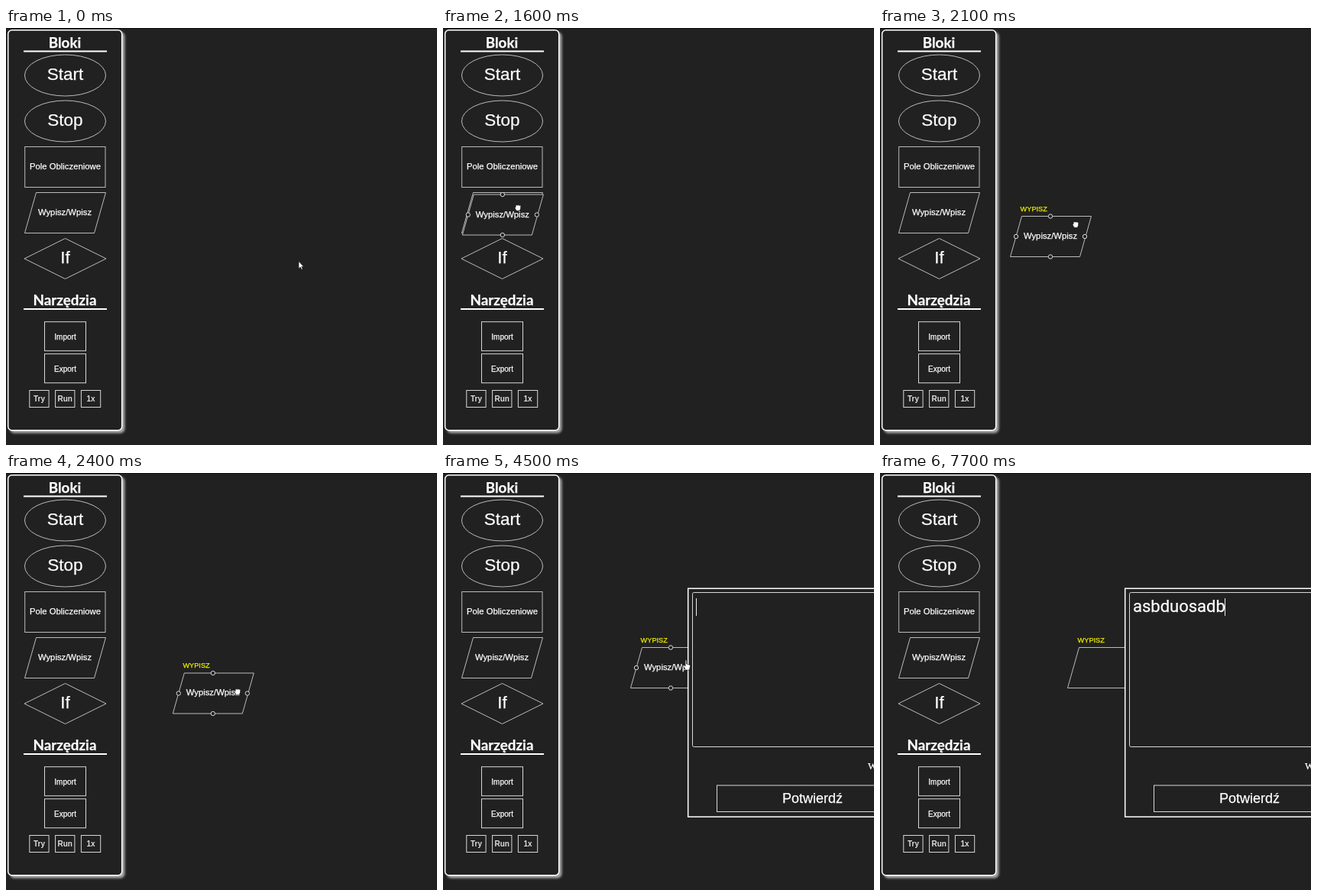
Write an HTML page that moves like this. It is 564 px wide and 546 px high and loops after 8 s.

```html
<!DOCTYPE html>
<html lang="pl">
<head>
<meta charset="utf-8">
<title>Bloki</title>
<style>
  html, body { margin: 0; width: 100%; height: 100%; overflow: hidden; background: #212121; }
  svg { display: block; width: 564px; height: 546px; }
  text { font-family: "Liberation Sans", Arial, sans-serif; fill: #fff; stroke: #fff; stroke-width: .25; text-anchor: middle; }
  .head { font: bold 18.8px Lato, sans-serif; }
  .big { font-size: 22.5px; }
  .mid { font-size: 11.3px; }
  .small { font-size: 10px; }
  .tool { font-size: 10px; font-weight: bold; fill: #ddd; stroke: none; }
  .label { font-size: 9.2px; fill: #f0f000; stroke: #f0f000; text-anchor: start; }
  .confirm { font-size: 18px; }
  .serif { font: 13px "Liberation Serif", serif; text-anchor: start; }
  .typed { font: 22px Roboto, sans-serif; text-anchor: start; }
  .line { fill: #212121; stroke: #bbb; }
  .bright { stroke: #d8d8d8; }
  .frame { fill: #212121; stroke: #fff; stroke-width: 1.5; }
  .panel { filter: drop-shadow(3px 3px 1.5px #aaa); }
  .cursor { fill: #fff; stroke: #111; stroke-width: .6; }
</style>
</head>
<body>
<svg viewBox="0 0 564 546">
  <defs>
    <path id="slant" class="line" d="M15.5 .5H106.5L91.5 53.5H.5Z"/>
  </defs>
  <rect width="564" height="546" fill="#212121"/>
  <rect width="564" height="1" fill="#101214"/>

  <rect class="frame panel" x="2.7" y="2.7" width="149" height="524" rx="5"/>
  <text class="head" x="77" y="25.5">Bloki</text>
  <text class="head" x="77" y="363">Narzędzia</text>
  <path d="M23 30.5H132M23 368H132" stroke="#fff" stroke-width="2"/>
  <ellipse class="line" cx="77.5" cy="62" rx="53" ry="27"/>
  <ellipse class="line" cx="77.5" cy="122" rx="53" ry="27"/>
  <rect class="line" x="24.7" y="155.5" width="105.3" height="53"/>
  <use href="#slant" x="24" y="215"/>
  <path class="line" d="M24 302L77.5 275.5L131 302L77.5 328.5Z"/>
  <text class="big" x="77.5" y="68">Start</text>
  <text class="big" x="77.5" y="128">Stop</text>
  <text class="mid" x="77.5" y="185">Pole Obliczeniowe</text>
  <text class="mid" x="77" y="245">Wypisz/Wpisz</text>
  <text class="big" x="77.5" y="308">If</text>
  <g id="buttons"></g>

  <g id="block">
    <use href="#slant"/>
    <text id="label" class="label" x="13.6" y="-6.3">WYPISZ</text>
    <g id="details">
      <text class="mid" x="53" y="30">Wypisz/Wpisz</text>
      <g class="line bright">
        <circle cx="53" cy=".5" r="2.7"/>
        <circle cx="8" cy="27" r="2.7"/>
        <circle cx="98" cy="27" r="2.7"/>
        <circle cx="53" cy="53.5" r="2.7"/>
      </g>
    </g>
  </g>

  <g id="dialog">
    <rect class="frame" x="320.7" y="151.2" width="300" height="299"/>
    <rect class="line bright" x="326.5" y="156.5" width="280" height="202" rx="2"/>
    <text class="serif" x="556" y="387.5">Wypisz</text>
    <rect class="line bright" x="358.5" y="409" width="250" height="34.5"/>
    <text class="confirm" x="483.5" y="432">Potwierdź</text>
    <text id="typed" class="typed" x="331" y="182"></text>
    <path id="caret" d="M.5 164V187" stroke="#eee"/>
  </g>

  <g id="cursor" class="cursor">
    <path id="arrow" d="M0 0V9.5L2.2 7.6L3.7 10.8L5.2 10.1L3.8 7H6.6Z"/>
    <path id="open" d="M-1.8 5L-4.5 .5L-3.4-.3L-2-.1L-2.8-3.6L-1.7-4L-.7-1.2V-5H.6L.9-1.2L2-4.3L3-3.8L2.5-.6L3.8-2.4L4.5-1.6L2.7 5Z"/>
    <path id="fist" d="M-1.8 4.3L-4 .7L-2.9-.5V-2.8L-1.5-3.3L-.6-2.5L.3-3.6L1.3-2.6L2.5-3.1L3.8-1.8L3.5 1.5L2.4 4.3Z"/>
    <path id="point" d="M-1.4 7L-4.6 1.5L-3.2 .6L-1.9 2V-6H-.2V-1L3.8 .2L4.6 1.5L3.3 7Z"/>
  </g>
</svg>
<script>
const LOOP = 8000;
const TICK = 100;
const byId = id => document.getElementById(id);
const show = (id, on) => { byId(id).style.display = on ? '' : 'none'; };
const moveTo = (id, x, y) => byId(id).setAttribute('transform', `translate(${x} ${y})`);
const clamp = k => Math.min(1, Math.max(0, k));
const ease = k => k * k * (3 - 2 * k);
const mix = (a, b, k) => a + (b - a) * k;

const button = (caption, cls, x, y, w, h) =>
  `<rect class="line bright" x="${x}" y="${y}" width="${w}" height="${h}"/>
   <text class="${cls}" x="${x + w / 2}" y="${y + h / 2 + 3.8}">${caption}</text>`;
byId('buttons').innerHTML = [
  ...['Import', 'Export'].map((name, i) => button(name, 'small', 50.5, 384.7 + 42 * i, 54, 38)),
  ...['Try', 'Run', '1x'].map((name, i) => button(name, 'tool', 30.8 + 33.8 * i, 474.5, 25.3, 22))
].join('');

// Key points: time, x, y
const APPROACH = [[200, 383, 305.5], [1100, 97, 233]];
const DRAG = [
  [1300, 24, 215], [1700, 25, 218], [2000, 86, 250], [2100, 170, 246],
  [2200, 183, 240], [2500, 230, 269], [2800, 245, 228]
];
const GRIP = { x: 73, y: 17, lead: 100 };
const CURSORS = [[0, 'arrow'], [1200, 'open'], [1300, 'fist'], [3300, 'open'], [3400, 'point'], [6700, 'none']];
const WORD = 'asbduosadb';

function follow(points, t) {
  const next = Math.max(1, points.findIndex(point => point[0] > t));
  const i = t >= points[points.length - 1][0] ? points.length - 1 : next;
  const [from, to] = [points[i - 1], points[i]];
  const k = ease(clamp((t - from[0]) / (to[0] - from[0])));
  return [mix(from[1], to[1], k), mix(from[2], to[2], k)];
}

function cursorAt(t, kind) {
  if (kind === 'arrow') return follow(APPROACH, t);
  if (kind === 'point') return [319, 251];
  const [x, y] = follow(DRAG, t + GRIP.lead);
  return [x + GRIP.x, y + GRIP.y];
}

// Typing restarts the blink.
function caretOn(t) {
  const start = t < 5100 ? 3375 : 5475;
  return Math.floor(Math.max(0, t - start) / 525) % 2 === 0;
}

function draw(t) {
  const kind = CURSORS.filter(([from]) => from <= t).pop()[1];
  for (const name of ['arrow', 'open', 'fist', 'point']) show(name, name === kind);
  moveTo('cursor', ...cursorAt(t, kind));

  show('block', t >= 1400);
  moveTo('block', ...follow(DRAG, t));
  show('label', t >= 2100);
  show('details', t < 6700);

  show('dialog', t >= 3400);
  const typed = byId('typed');
  const count = t < 5100 ? 0 : 1 + Math.round(9 * clamp((t - 5200) / 500));
  typed.textContent = WORD.slice(0, count);
  const width = count ? typed.getComputedTextLength() : 0;
  moveTo('caret', Math.floor(331 + width), 0);
  show('caret', caretOn(t));
}

function tick() {
  const t = performance.now() % LOOP;
  draw(Math.floor(t / TICK) * TICK);
  requestAnimationFrame(tick);
}
tick();
</script>
</body>
</html>
```
